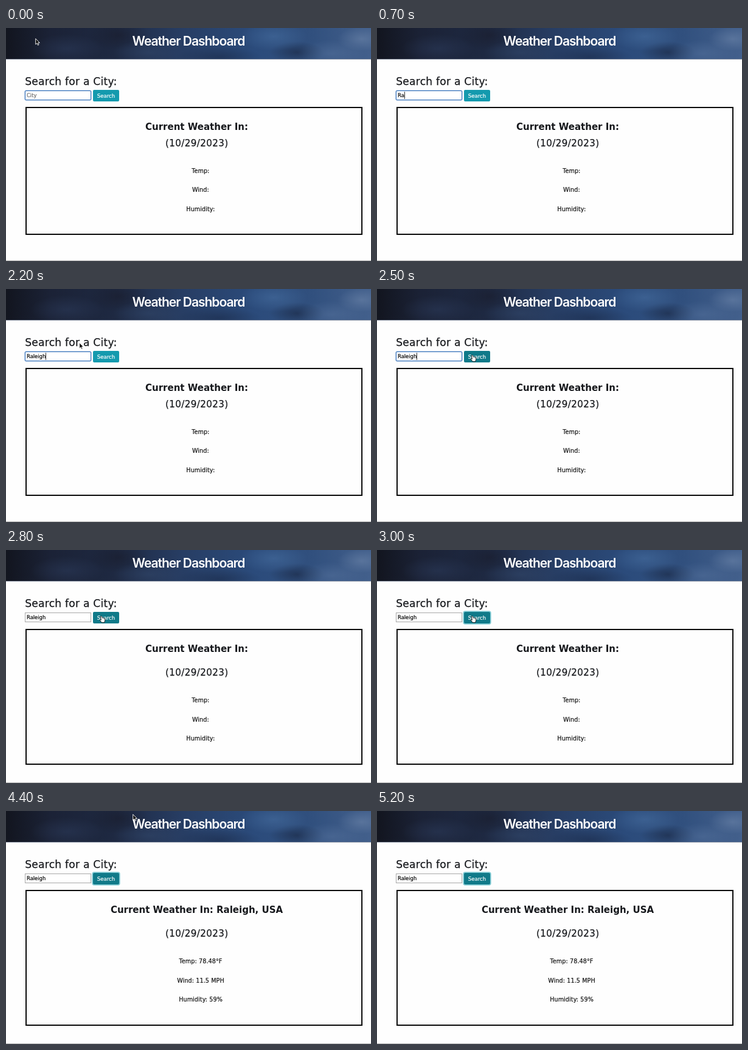
An HTML page for the animation above (5.3 s loop, 600 px wide and 384 px high).

```html
<!DOCTYPE html>
<html lang="en">
<head>
<meta charset="utf-8">
<title>Weather Dashboard</title>
<style>
  html, body { margin: 0; width: 100%; height: 100%; overflow: hidden; background: #fefefe; }
  body { position: relative; font-family: "DejaVu Sans", Verdana, sans-serif; }
  body > * { position: absolute; box-sizing: border-box; }

  header {
    left: 0; top: 0; width: 600px; height: 51px; box-shadow: 0 1px #8f98a8;
    background:
      radial-gradient(ellipse 40px 20px at 585px 18px, #7189ad80, transparent),
      radial-gradient(ellipse 55px 22px at 535px 42px, #5f7ba566, transparent),
      radial-gradient(ellipse 55px 24px at 440px 14px, #4a73a580, transparent),
      radial-gradient(ellipse 45px 18px at 478px 40px, #1c2c4ab3, transparent),
      radial-gradient(ellipse 70px 18px at 350px 48px, #1b2c4c99, transparent),
      radial-gradient(ellipse 60px 20px at 235px 40px, #34496c80, transparent),
      radial-gradient(ellipse 50px 26px at 185px 12px, #191c2b99, transparent),
      radial-gradient(ellipse 60px 24px at 100px 34px, #2d3d5e80, transparent),
      linear-gradient(90deg, #12151f, #1b2236 12%, #1e2942 30%, #273d63 48%, #2b4b7b 68%, #31507e 84%, #43608c);
  }

  svg { left: 0; top: 0; width: 600px; height: 384px; overflow: hidden; }
  .title { font: 600 21px Inter, sans-serif; letter-spacing: -1.02px; fill: #fff; }
  .label { font-size: 17.1px; letter-spacing: .24px; fill: #16181c; stroke: #16181c; stroke-width: .25px; }
  .mid { text-anchor: middle; }
  .place { font-size: 15px; font-weight: bold; fill: #16181c; }
  .date { font-size: 15px; letter-spacing: .45px; fill: #16181c; stroke: #16181c; stroke-width: .25px; }
  .facts { font-size: 9.6px; letter-spacing: .1px; fill: #111; stroke: #111; stroke-width: .2px; }

  .card { left: 32px; top: 130px; width: 554px; height: 211px; border: 2px solid #0a0a0a; }
  .rule { left: 0; top: 383px; width: 600px; height: 1px; background: #b4b4b4; }

  .field { left: 31px; top: 103px; width: 109px; height: 16px; border: 1px solid #2f6db8; border-radius: 2px; background: #fff; box-shadow: 0 0 0 .5px #2f6db880; }
  .blur { left: 30px; top: 102px; width: 111px; height: 18px; background: #fefefe; }
  .blur::after { content: ""; position: absolute; inset: 1px; border: 1px solid #a8a8a8; background: #fff; }
  .hint, .typed { left: 34px; top: 105px; height: 12px; font-size: 8.4px; line-height: 12px; white-space: nowrap; -webkit-text-stroke: .2px; }
  .hint { color: #6a6a6a; }
  .typed { box-sizing: content-box; overflow: hidden; width: 0; color: #000; border-right: 1px solid transparent; }

  .button {
    left: 143px; top: 102px; width: 43px; height: 19px; border-radius: 2px; background: #149aae;
    color: #fff; font-size: 8.6px; line-height: 20px; text-align: center; -webkit-text-stroke: .2px;
  }

  .pointer { left: 0; top: 0; width: 12px; height: 15px; overflow: visible; }

  /* timeline: 1% = 53 ms */
  .card, .low, .typed, .hint, .idle, .done, .blur, .pointer, .arrow, .hand { animation: 5300ms step-end infinite; }
  .button { animation: press 5300ms linear infinite; }
  .card { animation-name: grow; }
  .low { animation-name: drop; }
  .typed { animation-name: type; }
  .hint { animation-name: hint; }
  .idle { animation-name: idle; }
  .done { animation-name: done; }
  .blur { animation-name: blur; }
  .pointer { animation-name: move; }
  .arrow { animation-name: arrow; }
  .hand { animation-name: hand; }

  @keyframes grow { 52.83%, 100% { height: 224px; } }
  @keyframes drop { 0% { transform: none; } 52.83%, 100% { transform: translateY(12.7px); } }
  @keyframes hint { 0% { opacity: 1; } 9.43%, 100% { opacity: 0; } }
  @keyframes blur { 0% { opacity: 0; } 52.83%, 100% { opacity: 1; } }
  @keyframes idle { 0% { opacity: 1; } 58.49%, 100% { opacity: 0; } }
  @keyframes done { 0% { opacity: 0; } 58.49%, 100% { opacity: 1; } }
  @keyframes type {
    0% { width: 0; border-color: transparent; }
    9.43% { width: .69em; border-color: #333; }
    13.2% { width: 1.27em; border-color: #333; }
    15.09% { width: 1.55em; border-color: #333; }
    16.98% { width: 2.17em; border-color: #333; }
    18.86% { width: 2.45em; border-color: #333; }
    20.75% { width: 3.09em; border-color: #333; }
    22.64% { width: 3.73em; border-color: #333; }
    52.83%, 100% { width: 3.8em; border-color: transparent; }
  }
  @keyframes press {
    0%, 44% { background: #149aae; box-shadow: 0 0 0 0 #86cdd600; }
    47.1%, 52.5% { background: #107a89; box-shadow: 0 0 0 0 #86cdd600; }
    55.6%, 100% { background: #107a89; box-shadow: 0 0 0 1.7px #86cdd6; }
  }
  @keyframes move {
    0% { transform: translate(48px, 17px); opacity: 1; }
    9.43% { transform: translate(48px, 17px); opacity: 0; }
    30.18% { transform: translate(48px, 17px); opacity: 1; }
    32.07% { transform: translate(49px, 17px); opacity: 1; }
    33.96% { transform: translate(51px, 21px); opacity: 1; }
    35.84% { transform: translate(56px, 33px); opacity: 1; }
    37.73% { transform: translate(64px, 50px); opacity: 1; }
    39.62% { transform: translate(92px, 70px); opacity: 1; }
    41.5% { transform: translate(120px, 88px); opacity: 1; }
    43.39% { transform: translate(139px, 101px); opacity: 1; }
    45.28% { transform: translate(151px, 107px); opacity: 1; }
    47.16% { transform: translate(153px, 108px); opacity: 1; }
    75.47% { transform: translate(155px, 105px); opacity: 1; }
    77.35% { transform: translate(165px, 86px); opacity: 1; }
    79.24% { transform: translate(178px, 60px); opacity: 1; }
    81.13% { transform: translate(194px, 30px); opacity: 1; }
    83.01% { transform: translate(208px, 5px); opacity: 1; }
    84.9%, 100% { transform: translate(216px, -20px); opacity: 0; }
  }
  @keyframes arrow { 0% { opacity: 1; } 45.28% { opacity: 0; } 77.35%, 100% { opacity: 1; } }
  @keyframes hand { 0% { opacity: 0; } 45.28% { opacity: 1; } 77.35%, 100% { opacity: 0; } }
</style>
</head>
<body>
  <header></header>
  <div class="card"></div>
  <div class="rule"></div>

  <svg viewBox="0 0 600 384">
    <text class="title mid" x="300" y="29.3">Weather Dashboard</text>
    <text class="label" x="31.2" y="94">Search for a City:</text>
    <g class="mid">
      <g class="place">
        <text class="idle" x="313.5" y="168.3">Current Weather In:</text>
        <text class="done" x="313.5" y="168.3">Current Weather In: Raleigh, USA</text>
      </g>
      <g class="low">
        <text class="date" x="313.7" y="194.6">(10/29/2023)</text>
        <g class="facts idle">
          <text x="319.8" y="238.5">Temp:</text>
          <text x="319.8" y="270">Wind:</text>
          <text x="319.8" y="301.5">Humidity:</text>
        </g>
        <g class="facts done">
          <text x="320" y="238.5">Temp: 78.48°F</text>
          <text x="320" y="270">Wind: 11.5 MPH</text>
          <text x="320" y="301.5">Humidity: 59%</text>
        </g>
      </g>
    </g>
  </svg>

  <div class="field"></div>
  <div class="blur"></div>
  <div class="hint">City</div>
  <div class="typed">Raleigh</div>
  <div class="button">Search</div>

  <svg class="pointer" viewBox="0 0 12 15">
    <path class="arrow" d="M.7 .5V10L2.9 8 4.3 11.3 6 10.6 4.6 7.4H7.4Z" fill="#111" stroke="#fff" stroke-width=".9"/>
    <path class="hand" d="M2.6 1.2Q3.6 .2 4.3 1.4L5.2 4 Q6 3.3 6.8 4.2 7.6 3.7 8.3 4.7 9.6 4.3 9.8 6L9.6 8.6 8.6 11.6H4.4L1.2 7.6Q1 6.4 2.4 6.8L3.4 7.4 2.4 2.4Z" fill="#fff" stroke="#111" stroke-width=".9"/>
  </svg>
</body>
</html>
```
